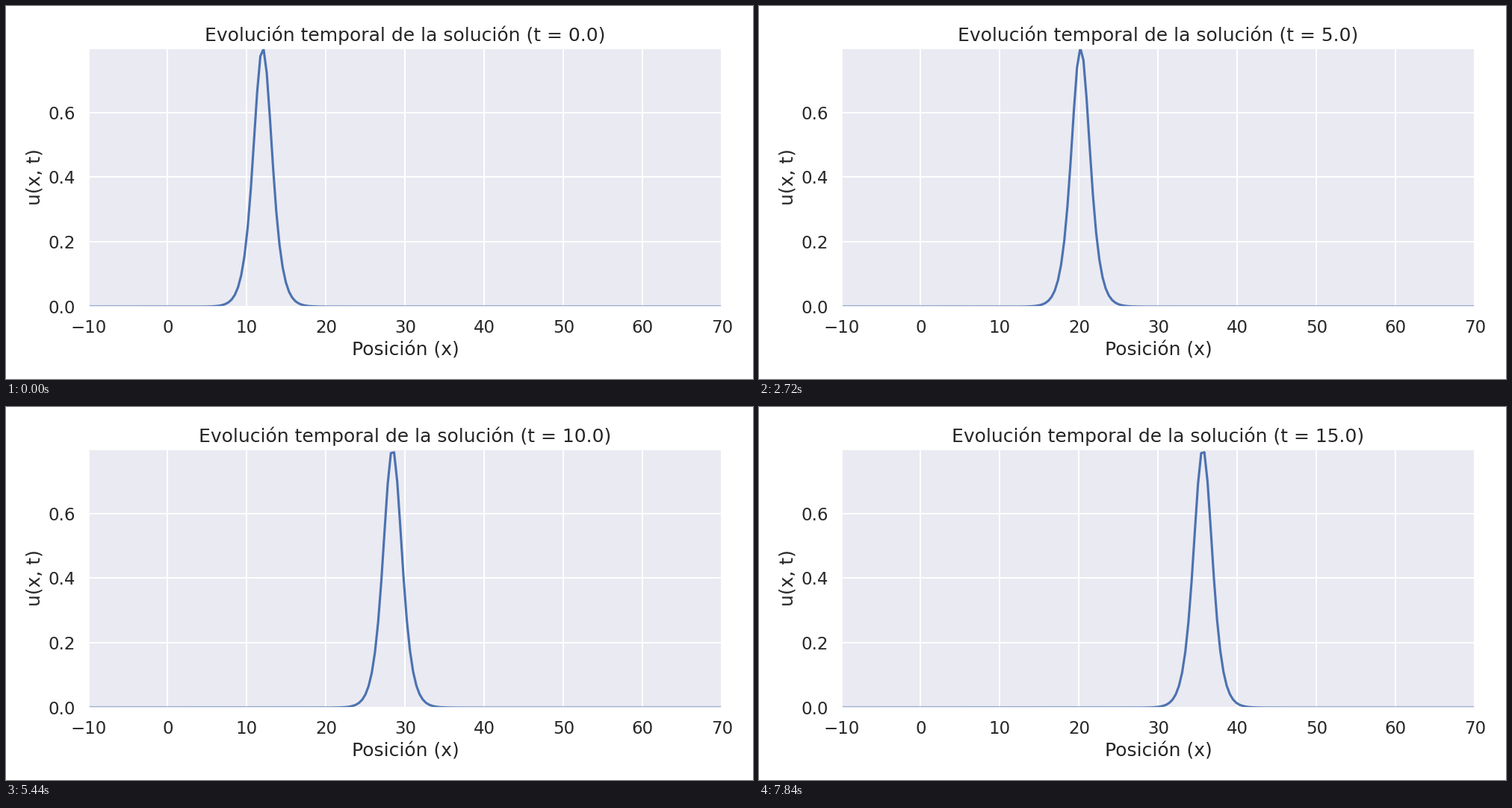
These frames come from a looping animation (1000 px wide and 500 px high, 8 s). A matplotlib script:

```python
import numpy as np
import matplotlib.pyplot as plt
from matplotlib.animation import FuncAnimation

FRAMES = 50
INTERVAL = 160
SPEED = 1.6
START = 12
DT = 60 / 199
INK = ".15"
SCALE = 1.5  # enlarges fonts, lines and ticks together

plt.rcParams.update({
    "font.family": "DejaVu Sans",
    "font.size": 12 * SCALE,
    "axes.titlesize": 12 * SCALE,
    "axes.labelsize": 12 * SCALE,
    "xtick.labelsize": 11 * SCALE,
    "ytick.labelsize": 11 * SCALE,
    "text.color": INK,
    "axes.labelcolor": INK,
    "xtick.color": INK,
    "ytick.color": INK,
    "axes.facecolor": "#EAEAF2",
    "axes.edgecolor": "white",
    "axes.linewidth": 1.25 * SCALE,
    "axes.axisbelow": True,
    "axes.grid": True,
    "grid.color": "white",
    "grid.linewidth": SCALE,
    "lines.linewidth": 1.5 * SCALE,
    "lines.solid_capstyle": "round",
    "xtick.bottom": False,
    "ytick.left": False,
    "xtick.major.size": 6 * SCALE,
    "ytick.major.size": 6 * SCALE,
})

x = np.linspace(-10, 70, 200)


def soliton(t):
    """Travelling-wave solution of the KdV equation."""
    phase = np.sqrt(SPEED) / 2 * (x - START - SPEED * t)
    return SPEED / 2 / np.cosh(phase) ** 2


def title_text(t):
    return f"Evolución temporal de la solución (t = {np.round(t):.1f})"


times = np.arange(FRAMES) * DT
peak = max(soliton(t).max() for t in times)

fig, ax = plt.subplots(figsize=(10, 5), dpi=100)
line, = ax.plot(x, soliton(0), color="#4C72B0")
title = ax.set_title(title_text(0))
ax.set_xlabel("Posición (x)")
ax.set_ylabel("u(x, t)")
ax.set_xticks(range(-10, 71, 10))
ax.set_yticks([0, 0.2, 0.4, 0.6])
ax.set_xlim(-10, 70)
ax.set_ylim(0, peak)
fig.tight_layout()


def update(frame):
    t = times[frame]
    line.set_ydata(soliton(t))
    title.set_text(title_text(t))
    return line, title


anim = FuncAnimation(fig, update, frames=FRAMES, interval=INTERVAL,
                     repeat=True, repeat_delay=0, blit=False)
plt.show()
```
